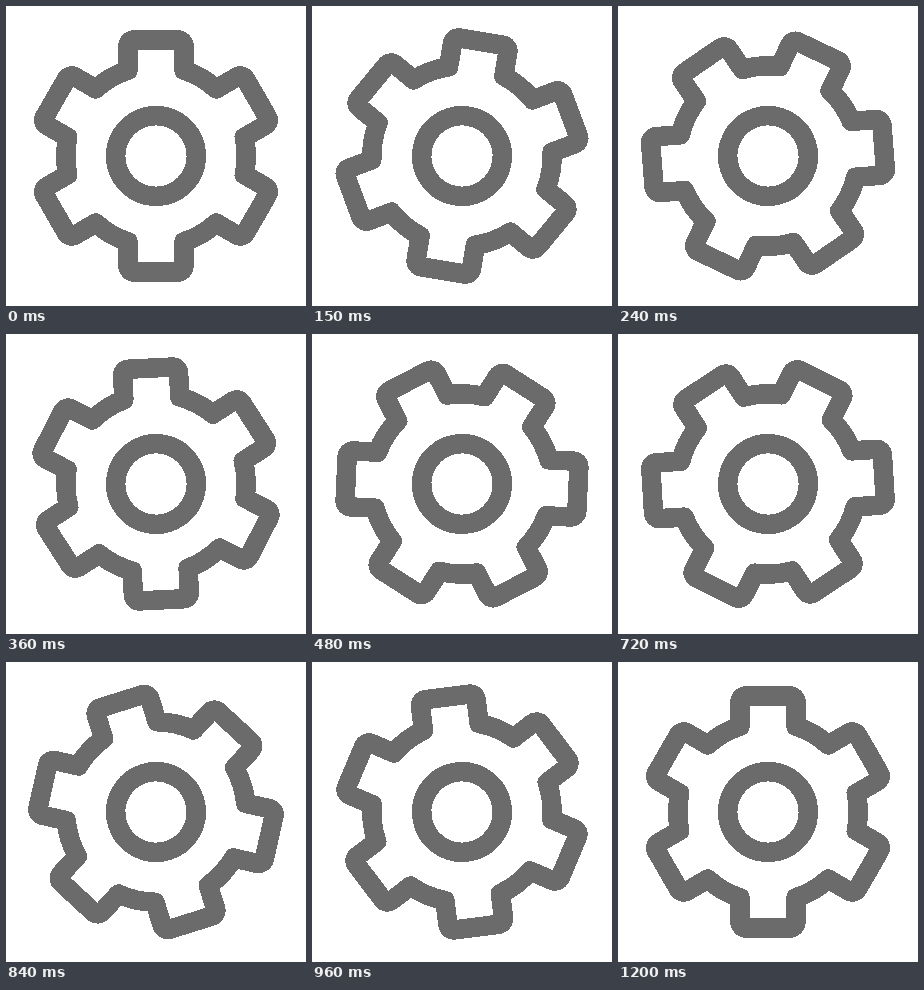
These frames come from a looping animation (300x300 px, 3.23 s). An HTML page:

```html
<!DOCTYPE html>
<html lang="en">
<head>
<meta charset="utf-8">
<title>Turning gear</title>
<style>
  html, body { margin: 0; width: 100%; height: 100%; overflow: hidden; background: #fff; }
  svg { display: block; width: 100%; height: 100%; }
</style>
</head>
<body>
<svg viewBox="0 0 300 300" shape-rendering="crispEdges">
  <g id="gear" fill="none" stroke="#6b6b6b" stroke-width="19.5" stroke-linejoin="round">
    <path id="rim"/>
    <circle r="40.3"/>
  </g>
</svg>
<script>
const LOOP = 3230, TURN = 1200, STEP = 30, ANGLE = 180;
const TEETH = 6, HALF = 28, TIP = 116, ROOT = 90.2, ROUND = 6;
const gear = document.getElementById('gear');

function rimPath() {
  const foot = -Math.sqrt(ROOT * ROOT - HALF * HALF);
  let d = '';
  for (let i = 0; i < TEETH; i++) {
    const a = i * 2 * Math.PI / TEETH, c = Math.cos(a), s = Math.sin(a);
    const at = (x, y) => `${(x * c - y * s).toFixed(2)} ${(x * s + y * c).toFixed(2)}`;
    const arc = (r, x, y) => `A${r} ${r} 0 0 1 ${at(x, y)}`;
    d += (i ? arc(ROOT, -HALF, foot) : 'M' + at(-HALF, foot))
      + 'L' + at(-HALF, ROUND - TIP) + arc(ROUND, ROUND - HALF, -TIP)
      + 'L' + at(HALF - ROUND, -TIP) + arc(ROUND, HALF, ROUND - TIP)
      + 'L' + at(HALF, foot);
  }
  return d + `A${ROOT} ${ROOT} 0 0 1 ${-HALF} ${foot.toFixed(2)}Z`;
}

// Cubic bezier easing (.333, 0, .38, 1), solved by bisection
function ease(x) {
  let lo = 0, hi = 1;
  for (let i = 0; i < 30; i++) {
    const s = (lo + hi) / 2, q = 1 - s;
    if (3 * s * q * (0.333 * q + 0.38 * s) + s ** 3 < x) lo = s; else hi = s;
  }
  return lo * lo * (3 - 2 * lo);
}

function draw(ms) {
  const t = Math.min(Math.floor(ms / STEP) * STEP, TURN);
  const angle = t < TURN ? ANGLE * ease(t / TURN) : 0;
  gear.setAttribute('transform', `translate(150 150) rotate(${angle.toFixed(3)})`);
}

document.getElementById('rim').setAttribute('d', rimPath());
const start = performance.now();
function tick() {
  draw((performance.now() - start) % LOOP);
  requestAnimationFrame(tick);
}
tick();
</script>
</body>
</html>
```
